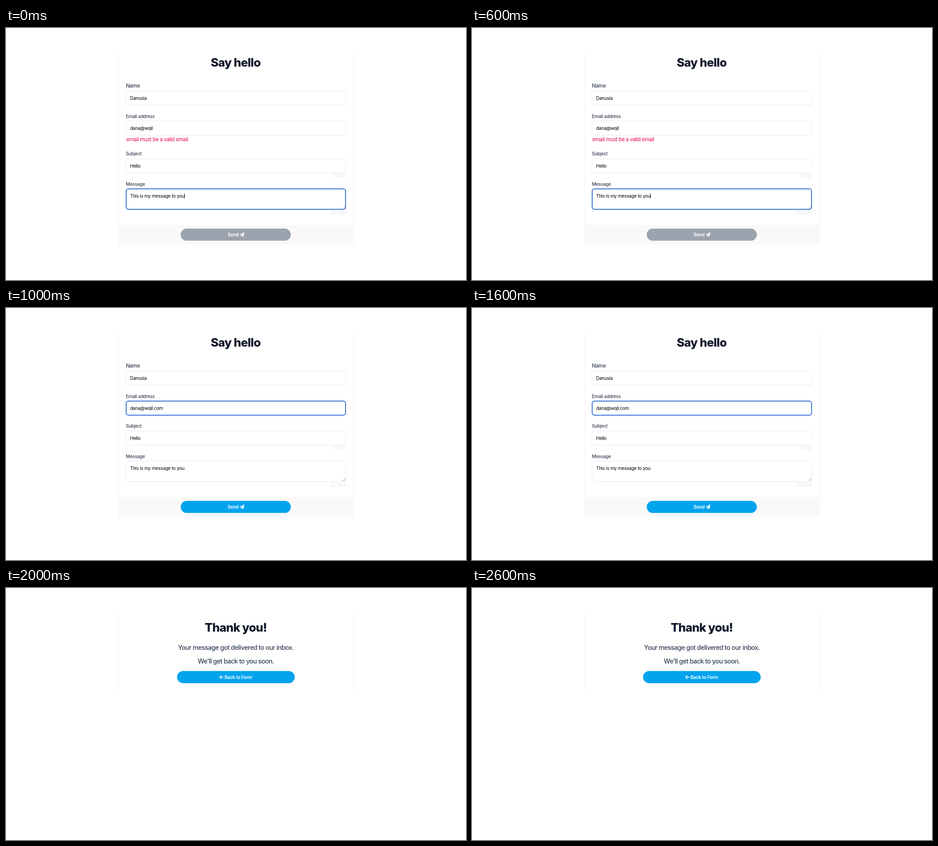
Animation of 1011 by 554 pixels, one loop 3 s. Source, as an HTML page:

```html
<!DOCTYPE html>
<html lang="en">
<head>
<meta charset="utf-8">
<title>Contact form</title>
<style>
  html, body { margin: 0; width: 100%; height: 100%; overflow: hidden; background: #fff; }
  svg { display: block; width: 1011px; height: 554px; }
  text {
    font: 400 10.1px Inter, "Open Sans", sans-serif;
    font-optical-sizing: none;
    letter-spacing: -.028em;
    fill: #000;
    white-space: pre;
  }
  .title { font-size: 25.9px; font-weight: 800; letter-spacing: -.029em; fill: #0f172a; text-anchor: middle; }
  .body { font-size: 14.2px; font-weight: 550; letter-spacing: -.041em; fill: #334155; text-anchor: middle; }
  .label { font-weight: 550; letter-spacing: -.03em; fill: #374151; }
  .big { font-size: 11.5px; font-weight: 500; }
  .error { font-size: 11.5px; letter-spacing: -.034em; fill: #e80a55; }
  .count { letter-spacing: -.02em; fill: #e2e4e8; text-anchor: end; }
  .button { font-weight: 600; letter-spacing: -.025em; fill: #fff; }
  .card { fill: #fff; filter: drop-shadow(0 .9px .6px rgba(0, 0, 0, .17)); clip-path: inset(2px -3px -4px -3px); }
</style>
</head>
<body>
<svg id="stage" viewBox="0 0 1011 554"></svg>
<script>
const stage = document.getElementById('stage');
const BLUE = '#03a4ee', GREY = '#9ca3af';

const text = (x, y, cls, s) => `<text x="${x}" y="${y}" class="${cls}">${s}</text>`;

const rect = (x, y, w, h, r, attrs) =>
  `<rect x="${x}" y="${y}" width="${w}" height="${h}" rx="${r}" ${attrs}/>`;

const card = (top, bottom) => rect(247.5, top, 516, bottom - top, 4.5, 'class="card"');

const field = (y, h, value, focused) =>
  (focused
    ? rect(264.2, y + .6, 482.1, h - 1, 4.8, 'fill="#fff" stroke="#1d5ccb" stroke-width="1.7"')
    : rect(264, y + 1, 482.5, h - .8, 5, 'fill="none" stroke="#000" stroke-opacity=".035"') +
      rect(263.9, y + .4, 482.7, h - .8, 4.8, 'fill="#fff" stroke="#e3e5e9" stroke-width=".8"')) +
  text(272.7, y + 19.6, '', value);

const plane = '<path fill="#fff" transform="translate(513.7 449)" ' +
  'd="M9.4.1 .3 5.3Q-.2 5.8.3 6.1L2.4 7 8 2.1Q8.3 2 8.2 2.3L3.4 8V9.5Q3.6 10.3 4.3 9.8' +
  'L5.5 8.3 7.9 9.3Q8.5 9.4 8.6 9L10 .6Q9.9 0 9.4.1Z"/>';

const backArrow = '<path d="M477.8 196H469.8M473.4 192.3 469.6 196 473.4 199.7" ' +
  'fill="none" stroke="#fff" stroke-width="1.3" stroke-linecap="round" stroke-linejoin="round"/>';

const grip = '<path d="M740.2 397.2 745.6 391.8M743.2 397.2 745.6 394.8" stroke="#777" stroke-width=".8"/>';

function form(valid) {
  const shift = valid ? -17 : 0;
  return card(45, 476 + shift) +
    text(504.7, 85, 'title', 'Say hello') +
    text(263.5, 131, 'label big', 'Name') +
    field(138, 32, 'Danusia', false) +
    text(263.5, 197.6, 'label', 'Email address') +
    field(204, 32, valid ? 'dana@wqil.com' : 'dana@wqil', valid) +
    (valid ? '' : text(264.6, 248.6, 'error', 'email must be a valid email')) +
    `<g transform="translate(0 ${shift})">` +
      text(263.5, 280.4, 'label', 'Subject') +
      field(287, 32, 'Hello', false) +
      text(746.6, 329.4, 'count', '5/100') +
      text(263.5, 346.5, 'label', 'Message') +
      field(353, 46, 'This is my message to you', !valid) +
      grip +
      (valid ? '' : rect(392.2, 363, .8, 11.5, 0, 'fill="#000"')) +
      text(746.6, 409.5, 'count', '25/500') +
      '<path d="M247.5 433H763.5V471.5Q763.5 476 759 476H252Q247.5 476 247.5 471.5Z" fill="#f9f9fa"/>' +
      rect(384, 441, 242, 26.6, 13.3, `fill="${valid ? BLUE : GREY}"`) +
      text(487, 457.8, 'button', 'Send') + plane +
    '</g>';
}

const thanks = () => card(48, 232) +
  text(505, 96, 'title', 'Thank you!') +
  text(505.2, 135.8, 'body', 'Your message got delivered to our inbox.') +
  text(505.2, 166.4, 'body', "We'll get back to you soon.") +
  rect(376, 182.6, 258.5, 26.6, 13.3, `fill="${BLUE}"`) +
  backArrow + text(480.2, 199.7, 'button', 'Back to Form');

const scenes = [form(false), form(true), thanks()];
let shown = -1;

function draw() {
  const scene = Math.floor(performance.now() % 3000 / 1000);
  if (scene !== shown) stage.innerHTML = scenes[shown = scene];
  requestAnimationFrame(draw);
}
draw();
</script>
</body>
</html>
```
